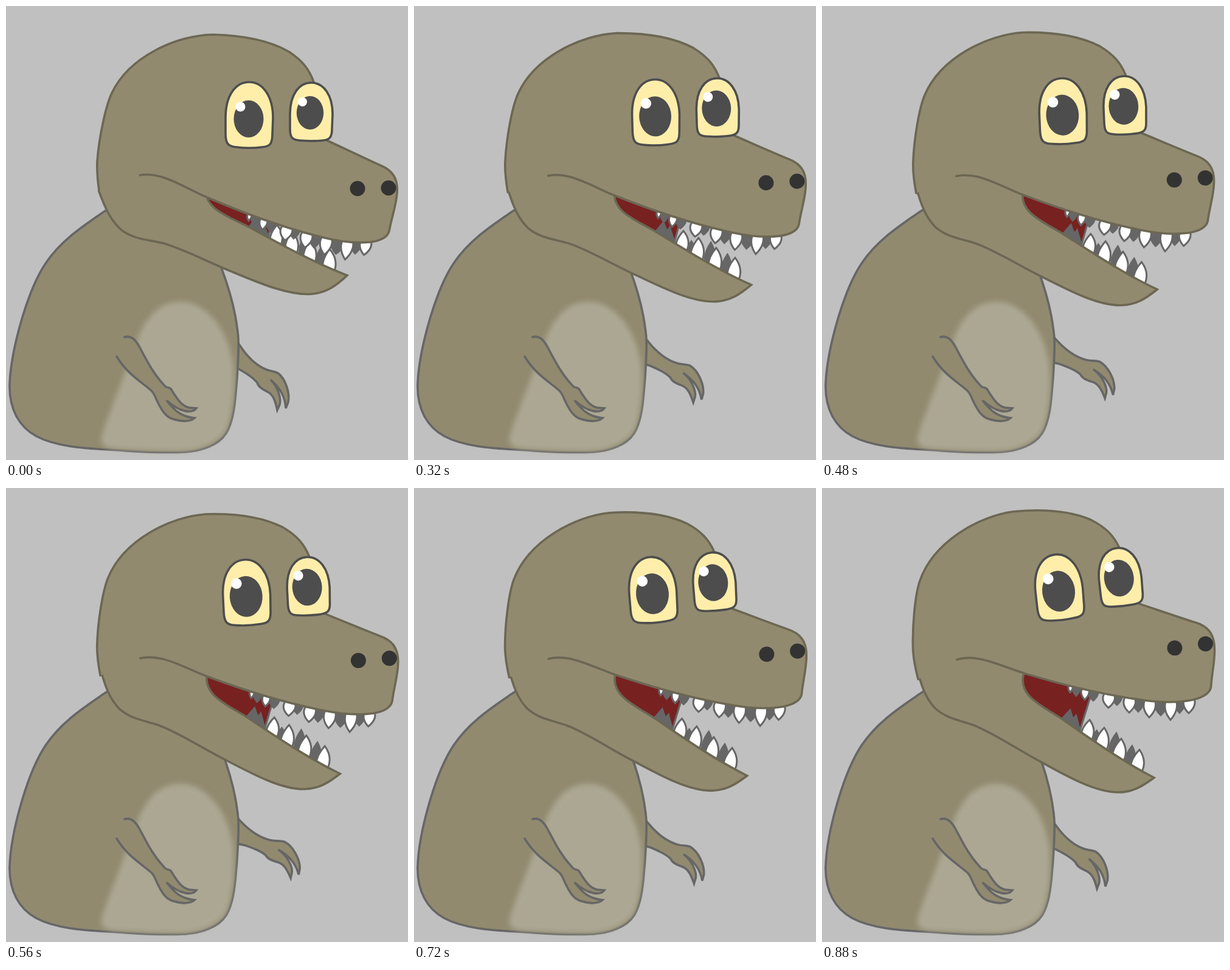
An HTML page for the animation above (960 ms loop, 661 by 746 pixels).

```html
<!DOCTYPE html>
<html lang="en">
<head>
<meta charset="utf-8">
<title>Dinosaur</title>
<style>
html, body { margin: 0; width: 100%; height: 100%; overflow: hidden; background: #c0c0c0; }
svg { display: block; width: 661px; height: 746px; }
.skin { fill: #918a6f; stroke: #666; stroke-width: 3.6; }
.face { fill: #918a6f; stroke: #6c6753; stroke-width: 3.6; }
.eye { fill: #fea; stroke: #4d4d4d; stroke-width: 3.6; }
.white { fill: #fff; stroke: #666; stroke-width: 3; }
.grey { fill: #666; stroke: #666; stroke-width: 2; }
</style>
</head>
<body>
<svg viewBox="0 0 661 746" stroke-linejoin="miter">
  <defs>
    <filter id="soft" x="-20%" y="-20%" width="140%" height="140%"><feGaussianBlur stdDeviation="4"/></filter>
  </defs>

  <g id="arm">
    <path class="skin" d="M360 530C374 541 380 549 384 557C395 574 408 589 427 597
      C434 600 441 600 447 603C460 613 467 636 464 651L460 661C459 641 450 627 435 614
      C447 626 453 645 450 655L446 664C443 650 440 639 430 634C422 630 415 626 413 619
      C406 610 394 603 382 596L355 585"/>
  </g>

  <path class="skin" d="M205 310C188 322 177 328 164 336C132 358 92 383 65 423
    C35 468 8 565 6 622C5 663 22 692 50 707C90 728 148 727 198 731C240 734 270 734 294 733
    C323 731 350 721 362 702C375 681 377 648 380 610C383 562 383 545 380 528C376 496 366 462 354 430L336 385"/>
  <path fill="#aca793" filter="url(#soft)" d="M287 486C253 486 230 510 215 550
    C198 600 172 660 157 708C154 722 166 727 185 728C225 730 265 732 292 731
    C324 730 350 716 362 698C374 670 376 630 374 593C366 530 328 486 287 486Z"/>
  <path class="skin" stroke-linecap="round" d="M195 544C207 541 214 550 220 561C230 580 243 606 262 625
    C265 628 268 626 271 629C280 643 288 658 302 660L313 661C306 670 286 668 264 648
    C276 664 288 675 310 677C301 685 283 682 270 677C258 671 252 656 249 650
    C246 644 244 637 239 632C219 615 199 604 182 576"/>

  <path id="mouth" fill="#782121"/>
  <path id="edge" fill="none" stroke="#666" stroke-width="3"/>

  <g id="jaw">
    <g id="lower"></g>
    <path class="face" d="M338 290C328 308 326 325 341 342C356 358 378 368 398 382
      C440 411 490 447 546 476C526 491 510 500 487 500C450 500 405 475 358 449
      C320 429 285 404 250 390C225 381 205 379 186 362C170 345 163 325 155 292"/>
    <path fill="#918a6f" d="M155 292L200 262L300 280L338 290L325 315L170 315Z"/>
  </g>

  <g id="head">
    <g id="upper" transform="rotate(6.56 255 264)"></g>
    <path class="face" stroke-linecap="round" d="M220 278C257 271 297 301 332 315
      C395 342 455 364 520 380C548 387 575 390 598 388C614 386 627 381 630 370
      C634 347 642 327 643 307C645 283 635 270 616 262C587 249 556 234 528 221
      C512 205 514 150 506 125C499 105 488 90 465 75C430 55 385 48 340 47
      C282 48 203 82 174 143C164 164 153 215 150 255C149 275 151 289 153 303"/>
    <circle cx="578" cy="300" r="12.5" fill="#333"/>
    <circle cx="629" cy="299" r="12.5" fill="#333"/>
    <path class="eye" d="M361 184C361 146 378 125 400 125C422 125 439 148 439 184L438 210
      C438 228 433 231 420 232C407 233.500 392 233.500 380 232C366 231 361 227 361 210Z"/>
    <g class="pupil" data-x="399" data-y="185.500">
      <ellipse cx="399" cy="185.500" rx="24.500" ry="30.500" fill="#4d4d4d"/>
      <circle cx="385.500" cy="165.500" r="8" fill="#fff"/>
    </g>
    <path class="eye" d="M467 178C467 145 482 126 502 126C522 126 537 146 537 178L536 202
      C536 216 532 220 520 221C509 222 495 222 484 221C471 220 467 217 467 202Z"/>
    <g class="pupil" data-x="500" data-y="175.500">
      <ellipse cx="500" cy="175.500" rx="22.200" ry="27.500" fill="#4d4d4d"/>
      <circle cx="487.500" cy="157.500" r="7.500" fill="#fff"/>
    </g>
  </g>
</svg>
<script>
const STEP = 80, COUNT = 12, TURN = 7;
const HEAD = [255, 264], JAW = [250, 323], ARM = [341, 541];
const JAW_OPEN = 6.29;
const $ = id => document.getElementById(id);
const pupils = [...document.querySelectorAll(".pupil")];

// Leaf-shaped tooth: tip, width, signed height towards the gum, sideways lean of the base.
function tooth(cls, [x, y, w, h], lean) {
  const b = x + lean, m = x + lean / 2;
  return `<path class="${cls}" d="M${b - w * 0.4} ${y + h}Q${m - w * 0.65} ${y + h * 0.5} ${x} ${y}` +
    `Q${m + w * 0.65} ${y + h * 0.5} ${b + w * 0.4} ${y + h}"/>`;
}
const row = (cls, list, lean) => list.map(t => tooth(cls, t, lean)).join("");

$("lower").innerHTML =
  '<path class="grey" d="M388 386L408 364L413 379L418 373L424 397L424 410Z"/>' +
  row("grey", [[452, 398, 18, 30], [484, 402, 18, 36], [510, 423, 18, 34]], -5) +
  row("white", [[440, 381, 22, 32], [464, 394, 23, 36], [492, 412, 23, 36], [522, 430, 23, 36]], -5);
$("upper").innerHTML =
  row("grey", [[418, 342, 14, -18], [446, 350, 18, -20], [485, 357, 18, -20],
    [520, 368, 20, -24], [557, 374, 22, -26], [588, 370, 20, -26]], 0) +
  row("white", [[408, 336, 8, -12], [432, 348, 14, -18], [471, 361, 21, -22],
    [505, 369, 21, -24], [538, 377, 21, -28], [573, 381, 21, -32], [603, 370, 20, -24]], 1);

function spin([x, y], [cx, cy], deg) {
  const a = deg * Math.PI / 180, c = Math.cos(a), s = Math.sin(a);
  return [cx + (x - cx) * c - (y - cy) * s, cy + (x - cx) * s + (y - cy) * c];
}
const rotate = (id, deg, c) => $(id).setAttribute("transform", `rotate(${deg} ${c[0]} ${c[1]})`);
const line = pts => "M" + pts.map(p => p.map(v => v.toFixed(2)).join(" ")).join("L");

function draw(ms) {
  const k = Math.floor(ms / STEP) % COUNT;
  const a = Math.min(k, TURN), b = Math.max(k - TURN, 0);
  const head = -(0.42 * a + 0.905 * b);
  const jaw = 0.72 * a + 0.3125 * b - JAW_OPEN;
  const arm = -(1.62 * a - 2.1 * b);
  const size = 1 + 0.1 * Math.sin(a / TURN * Math.PI / 2);

  rotate("head", head, HEAD);
  rotate("jaw", jaw, JAW);
  rotate("arm", arm, ARM);
  for (const p of pupils) {
    const { x, y } = p.dataset;
    p.setAttribute("transform", `translate(${x} ${y}) scale(${size}) translate(${-x} ${-y})`);
  }

  const top = spin([438, 348], HEAD, head), low = spin([423, 402], JAW, jaw);
  $("mouth").setAttribute("d", line([
    spin([330, 290], HEAD, head), top, low,
    spin([380, 400], JAW, jaw), spin([325, 350], JAW, jaw)
  ]) + "Z");
  $("edge").setAttribute("d", line([top, low]));
}

const start = performance.now();
function tick() {
  draw(performance.now() - start);
  requestAnimationFrame(tick);
}
draw(0);
requestAnimationFrame(tick);
</script>
</body>
</html>
```
